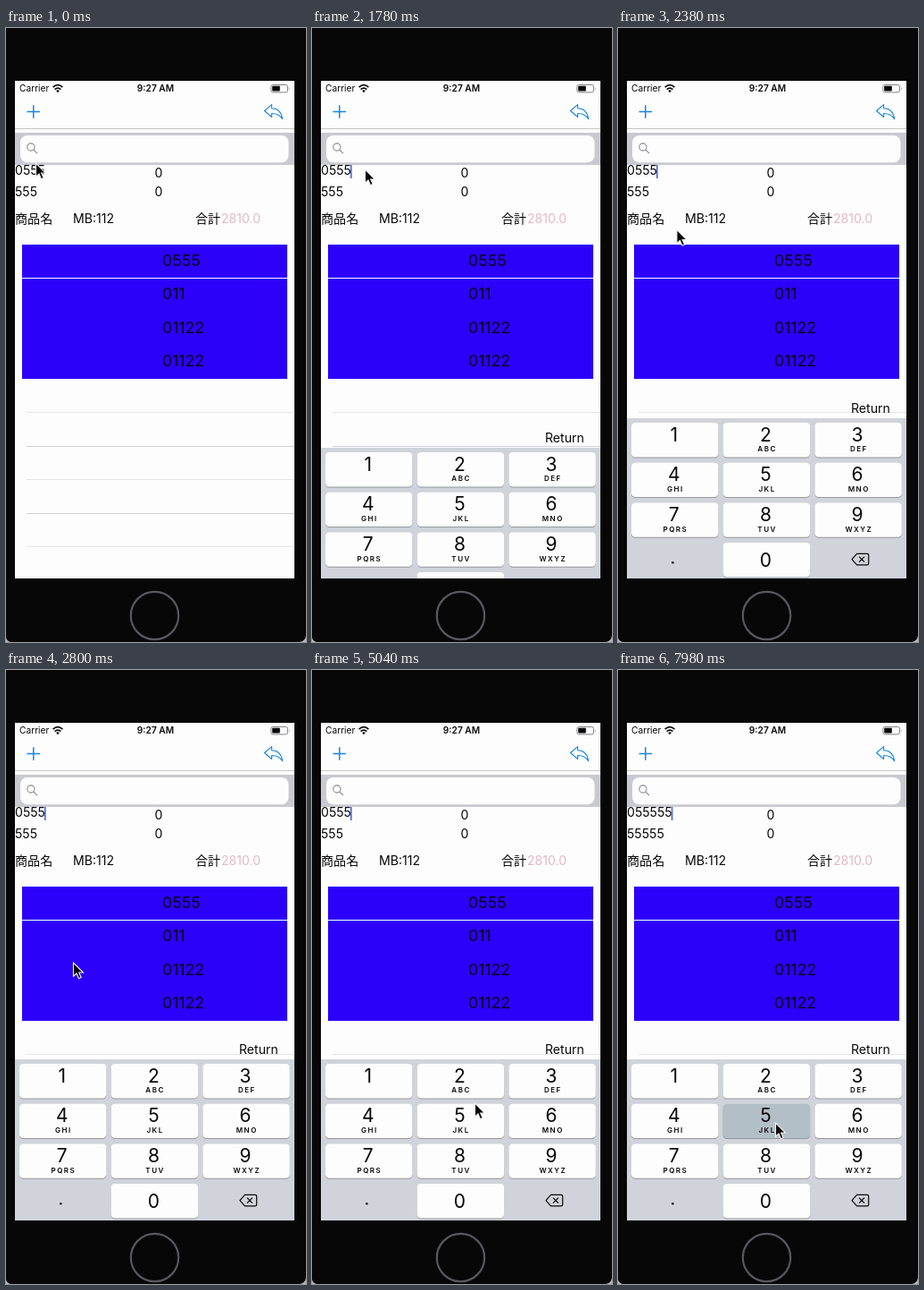
An HTML page that plays this animation: 336 px wide and 686 px high, repeating every 8000 ms.

```html
<!DOCTYPE html>
<html lang="en">
<head>
<meta charset="utf-8">
<title>Number pad entry</title>
<style>
  html, body { margin: 0; width: 100%; height: 100%; overflow: hidden; background: #070708; }
  svg { display: block; width: 100%; height: 100%; }
  text { font: 14.1px Inter, "Noto Sans CJK JP", "Noto Sans CJK", sans-serif; fill: #08080a; }
  .status { font-size: 10.2px; }
  .bold { font-weight: 600; }
  .cell { font-size: 17.7px; fill: #050018; }
  .digit { font-size: 21px; text-anchor: middle; }
  .letters { font-size: 8px; font-weight: 600; letter-spacing: 1.5px; text-anchor: middle; }
  .blue { fill: none; stroke: #1686e4; }
</style>
</head>
<body>
<svg viewBox="0 0 336 686">
  <defs><clipPath id="screen"><rect x="10" y="59" width="313" height="556"/></clipPath></defs>
  <rect width="336" height="686" fill="#070708"/>
  <path d="M0 681Q1 685 5 686H0ZM336 679Q335 685 329 686H336Z" fill="#b6b6bc"/>
  <circle cx="166.5" cy="656.5" r="26.7" fill="none" stroke="#58585e" stroke-width="2.2"/>

  <g clip-path="url(#screen)">
    <rect x="10" y="59" width="313" height="556" fill="#fdfdfd"/>

    <text class="status" x="15" y="71">Carrier</text>
    <text class="status bold" x="167.5" y="71" text-anchor="middle">9:27 AM</text>
    <g fill="none" stroke="#08080a" stroke-width="1.7">
      <path d="M52.6 66.2Q58 61.2 63.4 66.2M54.6 68.6Q58 65.6 61.4 68.6"/>
      <path d="M56.2 70L58 72.2 59.8 70Q58 68.6 56.2 70Z" fill="#08080a" stroke="none"/>
    </g>
    <rect x="296.9" y="63.5" width="18.6" height="8.4" rx="2" fill="none" stroke="#77777c" stroke-width=".9"/>
    <rect x="298.2" y="64.8" width="8.6" height="5.8" rx=".8" fill="#08080a"/>
    <path d="M317 66.2Q318.4 67.7 317 69.2Z" fill="#77777c"/>

    <path class="blue" d="M23.5 93.5H38M30.75 86.2V100.8" stroke-width="1.5"/>
    <path class="blue" d="M289.5 92.5L297.6 85.6V89.8Q308 90 309.6 101.6Q305.4 95.4 297.6 95.5V99.5Z"
          stroke-width="1.1" stroke-linejoin="round"/>
    <rect x="10" y="112" width="313" height="1" fill="#c6c6ca"/>

    <rect x="10" y="117" width="313" height="36" fill="#c9c9d1"/>
    <rect x="16" y="120" width="300.5" height="30.3" rx="8" fill="#fdfdfd"/>
    <g fill="none" stroke="#8b8b91" stroke-width="1.1">
      <circle cx="27.9" cy="133" r="4.1"/><path d="M30.9 136L35 140.2"/>
    </g>

    <text id="entry" x="10" y="164.2"></text>
    <rect id="caret" y="153" width="1.6" height="15" fill="#4468dc"/>
    <text x="166.6" y="166.6">0</text>
    <text id="mirror" x="10" y="187.6"></text>
    <text x="166.6" y="187.6">0</text>
    <text x="10" y="218">商品名</text>
    <text x="75" y="218">MB:112</text>
    <text x="212" y="218">合計</text>
    <text x="241" y="218" style="fill:#e4b8c6">2810.0</text>

    <g id="table">
      <rect x="18" y="242" width="297" height="150" fill="#2d00fa"/>
      <rect x="18" y="279" width="297" height="1" fill="#fdfdfd"/>
    </g>
    <g id="keyboard">
      <text x="261" y="-6.2">Return</text>
      <rect x="10" width="313" height="182" fill="#d0d3d9"/>
    </g>
  </g>

  <path id="pointer" d="M0 0V15.2L3.5 12 6 17.7 8.7 16.5 6.2 11H11Z" fill="#080808" stroke="#f4f4f4" stroke-width="1.1"/>
</svg>

<script>
const LOOP = 8000, KEY_TIMES = [5950, 7880], PRESS = 170;
const FOCUS = 1345, KEYBOARD_TOP = 435, KEYBOARD_HIDDEN = 635;
const ROW_TOP = 242, ROW_HEIGHT = 37.5;
// time, x, y of the pointer tip
const POINTER = [
  [0, 33.5, 151], [700, 33.5, 151], [1250, 59.5, 158], [2100, 59.5, 158], [2750, 75.5, 327],
  [3450, 75.5, 327], [4300, 182.5, 484], [5100, 182.5, 484], [5700, 176.5, 506], [LOOP, 176.5, 506]
];
const byId = id => document.getElementById(id);

function add(parent, tag, attrs, text = "") {
  const node = document.createElementNS("http://www.w3.org/2000/svg", tag);
  for (const name in attrs) node.setAttribute(name, attrs[name]);
  node.textContent = text;
  parent.append(node);
  return node;
}

const table = byId("table"), keyboard = byId("keyboard");
["0555", "011", "01122", "01122"].forEach((label, i) =>
  add(table, "text", { class: "cell", x: 175, y: ROW_TOP + 23.6 + i * ROW_HEIGHT }, label));
for (let i = 5; i < 10; i++)
  add(table, "rect", {
    x: 23, y: Math.floor(ROW_TOP + i * ROW_HEIGHT), width: 300, height: 1, fill: i % 2 ? "#e4e4e8" : "#d2d2d7"
  });

const keys = {};
function addKey(digit, letters, column, row) {
  const x = 15 + column * 102.7, y = 5 + row * 44.7, middle = x + 48.7;
  const shape = { x, width: 97.4, height: 38.4, rx: 4.2 };
  add(keyboard, "rect", { ...shape, y: y + 1, fill: "#96989d" });
  keys[digit] = add(keyboard, "rect", { ...shape, y, fill: "#fdfdfd" });
  add(keyboard, "text", { class: "digit", x: middle - 1, y: y + (row < 3 ? 20.6 : 26.4) }, digit);
  add(keyboard, "text", { class: "letters", x: middle + .7, y: y + 32.4 }, letters);
}
["", "ABC", "DEF", "GHI", "JKL", "MNO", "PQRS", "TUV", "WXYZ"].forEach((letters, i) =>
  addKey(String(i + 1), letters, i % 3, Math.floor(i / 3)));
addKey("0", "", 1, 3);
add(keyboard, "circle", { cx: 61.3, cy: 161.3, r: 1.3, fill: "#08080a" });
add(keyboard, "path", {
  d: "M267.5 151.4H279Q280.7 151.4 280.7 153V162.2Q280.7 163.8 279 163.8H267.5L262 157.6ZM270 154.6L276 160.6M276 154.6L270 160.6",
  fill: "none", stroke: "#08080a", "stroke-width": 1.2, "stroke-linejoin": "round"
});

function pointerAt(t) {
  const i = POINTER.findIndex(p => p[0] > t);
  const [t0, x0, y0] = POINTER[i - 1], [t1, x1, y1] = POINTER[i];
  const u = (t - t0) / (t1 - t0), ease = u * u * (3 - 2 * u);
  return [x0 + (x1 - x0) * ease, y0 + (y1 - y0) * ease];
}

// Critically damped spring: 1 at the start, settling to 0.
function springLeft(ms) {
  const w = Math.max(0, ms) * .00735;
  return (1 + w) * Math.exp(-w);
}

function setText(node, value) {
  if (node.textContent !== value) node.textContent = value;
}

function draw(t) {
  const typed = KEY_TIMES.filter(time => time <= t);
  const extra = "5".repeat(typed.length);
  const entry = byId("entry"), caret = byId("caret");
  setText(entry, "0555" + extra);
  setText(byId("mirror"), "555" + extra);

  const lastInput = typed.at(-1) ?? FOCUS;
  caret.setAttribute("x", 9 + entry.getComputedTextLength());
  caret.setAttribute("opacity", t >= FOCUS && (t - lastInput) % 1000 < 740 ? 1 : 0);

  const top = KEYBOARD_TOP + (KEYBOARD_HIDDEN - KEYBOARD_TOP) * springLeft(t - FOCUS);
  keyboard.setAttribute("transform", `translate(0 ${Math.round(top * 2) / 2})`);
  const pressed = typed.some(time => t - time < PRESS);
  keys[5].setAttribute("fill", pressed ? "#b3bfc6" : "#fdfdfd");
  byId("pointer").setAttribute("transform", `translate(${pointerAt(t)})`);
}

const start = performance.now();
function tick() {
  draw((performance.now() - start) % LOOP);
  requestAnimationFrame(tick);
}
tick();
</script>
</body>
</html>
```
